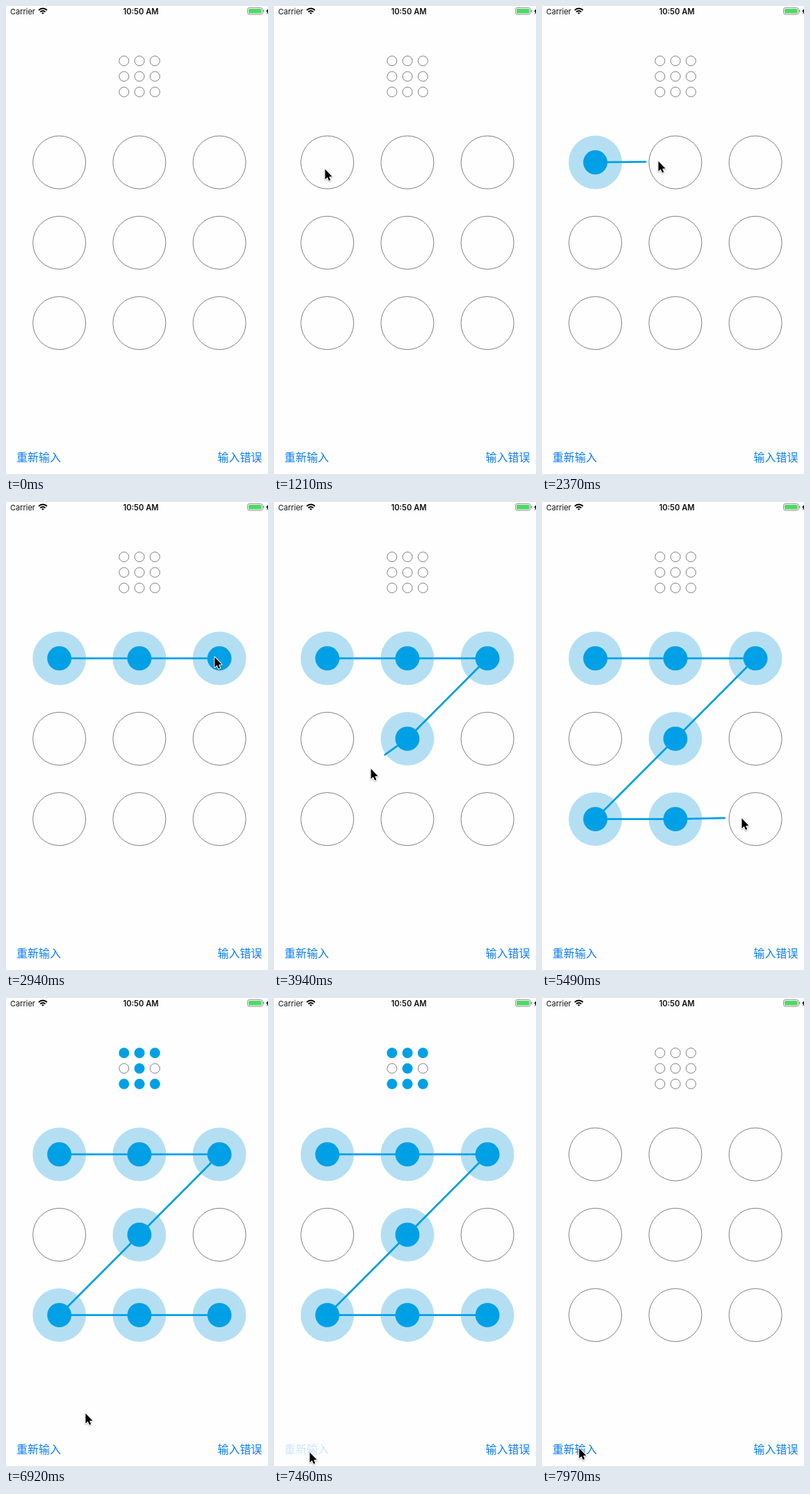
Recreate the animation shown at these times as an HTML page with a canvas. Size 377 px wide and 671 px high, loop 8 s.

```html
<!DOCTYPE html>
<html lang="zh">
<head>
<meta charset="utf-8">
<title>Pattern lock</title>
<style>
html, body { margin: 0; width: 377px; height: 671px; overflow: hidden; background: #fefefe; }
canvas { display: block; }
</style>
</head>
<body>
<canvas id="stage" width="377" height="671"></canvas>
<script>
const ctx = document.getElementById('stage').getContext('2d');
const LOOP = 8000, STEP = 60;
const BLUE = '#00a0e6', PALE = '#b4dff3', GREY = '#808080', LINK = '#0a7cff';
const PRESS = 1930, RELEASE = 5970, TAP = 7460, RESET = 7580, FADED = 7970;

const speedUp = k => k ** 1.6;
const slowDown = k => 1 - (1 - k) ** 1.6;

// Each pointer stroke speeds up to a midpoint, then slows to rest.
const entry = { x: 321, y: 654 };
const hops = [
  { start: 530, end: 810, x: 190, y: 410, ease: speedUp },
  { start: 810, end: 1210, x: 70, y: 229, ease: slowDown },
  { start: 1870, end: 2370, x: 167, y: 222, ease: speedUp },
  { start: 2370, end: 3000, x: 306, y: 222, ease: slowDown },
  { start: 3180, end: 3940, x: 139, y: 382, ease: speedUp },
  { start: 3940, end: 4350, x: 72, y: 454, ease: slowDown },
  { start: 4650, end: 5490, x: 287, y: 453, ease: speedUp },
  { start: 5490, end: 5610, x: 305, y: 453, ease: slowDown },
  { start: 6440, end: 6920, x: 114, y: 595, ease: speedUp },
  { start: 6920, end: 7280, x: 51, y: 651, ease: slowDown },
  { start: 7850, end: 7970, x: 53, y: 645, ease: slowDown }
];

const grid = (x, y, gap) =>
  Array.from({ length: 9 }, (_, i) => [x + i % 3 * gap, y + Math.floor(i / 3) * gap]);
const big = grid(76.7, 224.2, 115.2);
const small = grid(169.8, 78.7, 22.25);

function pointer(t) {
  let { x, y } = entry;
  for (const hop of hops) {
    if (t < hop.start) break;
    const k = hop.ease(Math.min(1, (t - hop.start) / (hop.end - hop.start)));
    x += (hop.x - x) * k;
    y += (hop.y - y) * k;
  }
  return [x, y];
}

// The touch trails the pointer by one tick.
const touch = t => pointer(t - STEP);

// Cells reached so far, in order.
function chosen(t) {
  const list = [];
  if (t >= RESET) return list;
  for (let u = PRESS; u <= Math.min(t, RELEASE); u += 10) {
    const [x, y] = touch(u);
    const hit = big.findIndex(c => Math.hypot(c[0] - x, c[1] - y) < 38);
    if (hit >= 0 && !list.includes(hit)) list.push(hit);
  }
  return list;
}

function disc([x, y], r, color) {
  ctx.beginPath();
  ctx.arc(x, y, r, 0, 7);
  ctx.fillStyle = color;
  ctx.fill();
}

function ring([x, y], r) {
  ctx.beginPath();
  ctx.arc(x, y, r, 0, 7);
  ctx.strokeStyle = GREY;
  ctx.lineWidth = 1;
  ctx.stroke();
}

function label(text, x, y, font, color, align = 'left') {
  ctx.font = font;
  ctx.fillStyle = color;
  ctx.textAlign = align;
  ctx.fillText(text, x, y);
}

function polygon(...points) {
  ctx.beginPath();
  points.forEach(p => ctx.lineTo(...p));
  ctx.closePath();
}

function box(x, y, w, h, r) {
  ctx.beginPath();
  ctx.roundRect(x, y, w, h, r);
}

function statusBar() {
  label('Carrier', 6, 11.5, '11px Inter, sans-serif', '#111');
  label('10:50 AM', 194, 11.5, '600 11.2px Inter, sans-serif', '#111', 'center');

  // Wi-Fi fan
  ctx.strokeStyle = '#000';
  ctx.lineWidth = 2;
  for (const r of [1.6, 5, 8.4]) {
    ctx.beginPath();
    ctx.arc(53, 12, r, -Math.PI * 0.75, -Math.PI * 0.25);
    ctx.stroke();
  }

  // Battery and the cut-off bolt
  ctx.strokeStyle = '#8f8f8f';
  ctx.lineWidth = 1;
  box(347.5, 2.5, 21.5, 9.5, 2.5);
  ctx.stroke();
  ctx.fillStyle = '#4cd964';
  box(349, 4, 18.5, 6.5, 1);
  ctx.fill();
  ctx.fillStyle = '#8f8f8f';
  ctx.fillRect(370, 5.5, 1.3, 3.5);
  ctx.fillStyle = '#000';
  polygon([378, 3], [374, 8], [376, 8], [375.5, 12], [379, 7]);
  ctx.fill();
}

function buttons(t) {
  const font = '16px "Noto Sans CJK SC", "Noto Sans CJK", sans-serif';
  const fade = Math.min(1, Math.max(0, (t - RESET) / (FADED - RESET)));
  ctx.globalAlpha = t < TAP ? 1 : 0.2 + 0.8 * fade;
  label('重新输入', 15, 653, font, LINK);
  ctx.globalAlpha = 1;
  label('输入错误', 304.5, 653, font, LINK);
}

function arrow([x, y]) {
  ctx.save();
  ctx.translate(x, y);
  polygon([0.5, 0.5], [0.5, 15], [3.8, 12], [6, 17], [8.3, 16], [6.2, 11.2], [10.6, 11]);
  ctx.lineJoin = 'round';
  ctx.shadowColor = 'rgba(0,0,0,.3)';
  ctx.shadowBlur = 2;
  ctx.shadowOffsetY = 1;
  ctx.strokeStyle = '#fff';
  ctx.lineWidth = 2;
  ctx.stroke();
  ctx.shadowColor = 'transparent';
  ctx.fillStyle = '#000';
  ctx.fill();
  ctx.restore();
}

function trail(list, t) {
  ctx.beginPath();
  list.forEach(i => ctx.lineTo(...big[i]));
  if (t < RELEASE) ctx.lineTo(...touch(t));
  ctx.strokeStyle = BLUE;
  ctx.lineWidth = 2.8;
  ctx.lineCap = ctx.lineJoin = 'round';
  ctx.stroke();
  ctx.lineCap = 'butt';
}

function draw(t) {
  ctx.fillStyle = '#fefefe';
  ctx.fillRect(0, 0, 377, 671);
  statusBar();

  const list = chosen(t);
  small.forEach((c, i) => t >= RELEASE && list.includes(i) ? disc(c, 7.5, BLUE) : ring(c, 7));
  big.forEach((c, i) => list.includes(i) ? disc(c, 38.4, PALE) : ring(c, 38));
  if (list.length) trail(list, t);
  list.forEach(i => disc(big[i], 17.4, BLUE));

  buttons(t);
  if (t >= hops[0].start) arrow(pointer(t));
}

// Time advances in ticks, counted anew from the start of each hop.
function frame(now) {
  const t = now % LOOP;
  const start = hops.reduce((s, hop) => hop.start <= t ? hop.start : s, 0);
  draw(start + Math.floor((t - start) / STEP) * STEP);
  requestAnimationFrame(frame);
}
requestAnimationFrame(frame);
</script>
</body>
</html>
```
